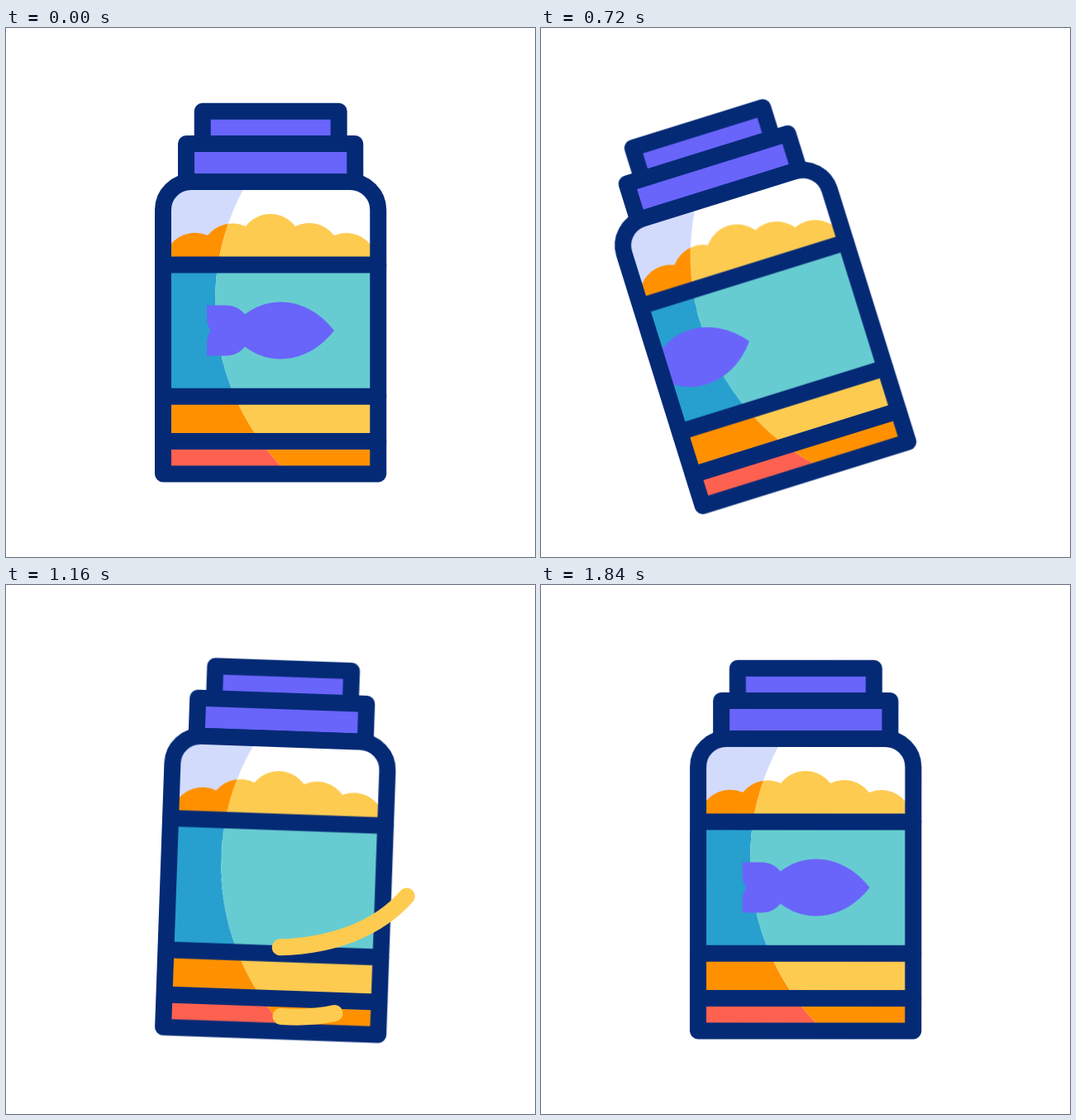
Write an HTML page without scripts that moves like this. It is 640 px wide and 640 px high and loops after 2 s.

```html
<!DOCTYPE html>
<html lang="en">
<head>
<meta charset="utf-8">
<title>Fish food jar</title>
<style>
  @property --head { syntax: "<number>"; inherits: false; initial-value: 0; }
  @property --tail { syntax: "<number>"; inherits: false; initial-value: 0; }

  :root {
    --navy: #042a76;
    --purple: #6964fa;
    --orange: #ff9100;
    --yellow: #fecb51;
    --ease: cubic-bezier(.333, 0, .667, 1);
  }
  html, body { margin: 0; width: 100%; height: 100%; overflow: hidden; background: #fff; }
  svg { display: block; width: 100%; height: 100%; }

  .jar { transform-origin: 320px 540px; animation: rock 2s var(--ease) infinite; }
  .fish { fill: var(--purple); animation: swim 2s var(--ease) infinite; }
  .line { stroke: var(--navy); stroke-width: 20; stroke-linejoin: round; stroke-linecap: round; }

  .swoosh {
    fill: none;
    stroke: var(--yellow);
    stroke-width: 20;
    stroke-linecap: round;
    stroke-dasharray: calc((var(--head) - var(--tail)) * 1px) 300px;
    stroke-dashoffset: calc(var(--tail) * -1px);
  }
  .upper {
    animation: upper-head 2s var(--ease) infinite, upper-tail 2s var(--ease) infinite,
               upper-show 2s step-end infinite;
  }
  .lower {
    animation: lower-head 2s var(--ease) infinite, lower-tail 2s var(--ease) infinite,
               lower-show 2s step-end infinite;
  }

  @keyframes rock {
    0%, 10% { transform: rotate(0deg); }
    34.5% { transform: rotate(-18deg); }
    50.4% { transform: rotate(8deg); }
    66% { transform: rotate(-4.3deg); }
    76.5% { transform: rotate(2.4deg); }
    93%, 100% { transform: rotate(0deg); }
  }
  @keyframes swim {
    0%, 10% { transform: translateX(0); }
    34.5% { transform: translateX(-103px); }
    50.4% { transform: translateX(235px); }
    50.41%, 66% { transform: translateX(-225px); }
    76.5% { transform: translateX(55px); }
    93%, 100% { transform: translateX(0); }
  }

  @keyframes upper-head { 0%, 38% { --head: 0; } 61%, 100% { --head: 100; } }
  @keyframes upper-tail { 0%, 46% { --tail: 0; } 69%, 100% { --tail: 100; } }
  @keyframes upper-show { 0% { opacity: 0; } 39% { opacity: 1; } 67.5% { opacity: 0; } 100% { opacity: 0; } }

  @keyframes lower-head { 0%, 50% { --head: 0; } 67%, 100% { --head: 100; } }
  @keyframes lower-tail { 0%, 57.5% { --tail: 0; } 74.5%, 100% { --tail: 100; } }
  @keyframes lower-show { 0% { opacity: 0; } 51% { opacity: 1; } 73.5% { opacity: 0; } 100% { opacity: 0; } }
</style>
</head>
<body>
<svg viewBox="0 0 640 640" xmlns="http://www.w3.org/2000/svg">
  <defs>
    <clipPath id="lit"><circle cx="541" cy="331" r="288"/></clipPath>
    <clipPath id="label"><rect x="195" y="290" width="250" height="152"/></clipPath>
    <path id="glass" d="M190 539.5V220a34 34 0 0 1 34-34H416.3a34 34 0 0 1 34 34V539.5Z"/>
    <path id="food" d="M190 286V268L200 261A38 38 0 0 1 244 251A38 38 0 0 1 290 240A37.5 37.5 0 0 1 350 240A38 38 0 0 1 397 251A38 38 0 0 1 440 261L450 268V286Z"/>
    <rect id="sticker" x="190" y="286" width="260" height="160"/>
    <rect id="band" x="190" y="446" width="260" height="54"/>
    <rect id="base" x="190" y="500" width="260" height="40"/>
  </defs>

  <g class="jar">
    <g class="line" fill="var(--purple)">
      <rect x="237.7" y="100.7" width="165" height="40"/>
      <rect x="218" y="140" width="204.3" height="46"/>
    </g>

    <use href="#glass" fill="#d2dbfc"/>
    <use href="#food" fill="var(--orange)"/>
    <use href="#sticker" fill="#27a0cf"/>
    <use href="#band" fill="var(--orange)"/>
    <use href="#base" fill="#ff6150"/>

    <g clip-path="url(#lit)">
      <use href="#glass" fill="#fff"/>
      <use href="#food" fill="var(--yellow)"/>
      <use href="#sticker" fill="#67ccd1"/>
      <use href="#band" fill="var(--yellow)"/>
      <use href="#base" fill="var(--orange)"/>
    </g>

    <g clip-path="url(#label)">
      <path class="fish" d="M243 335.5H266C276 335.5 284 340 289 346.5C302 336.5 317 331.5 332 331.5C360 331.5 382 347 397 366C382 385 360 400.5 332 400.5C317 400.5 302 395.5 289 385.5C284 392 276 396.5 266 396.5H243V381C243 375 245 370 247.5 366C245 362 243 357 243 351Z"/>
    </g>

    <use href="#glass" class="line" fill="none"/>
    <path class="line" d="M190 286.5H450.3M190 445.7H450.3M190 500H450.3"/>
  </g>

  <path class="swoosh upper" pathLength="100" d="M147 342C177 395 255 438.5 321 438.5C400 438.5 462 412 496 362"/>
  <path class="swoosh lower" pathLength="100" d="M332 522C390 526 436 513 463.5 481"/>
</svg>
</body>
</html>
```
